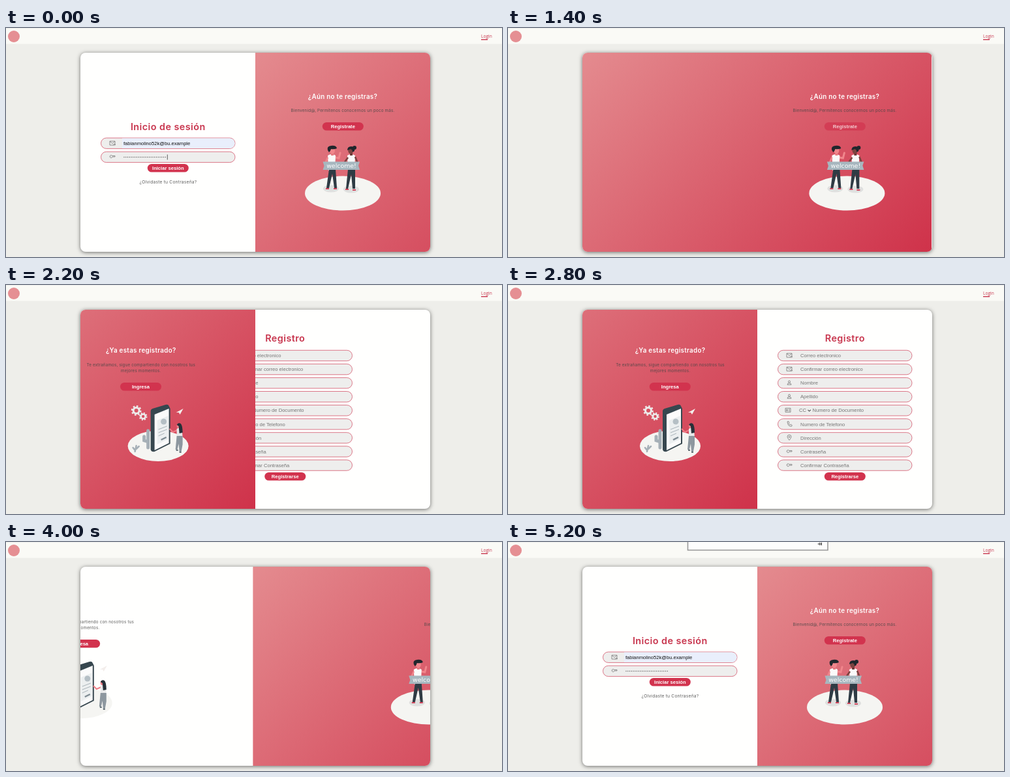
Recreate the animation shown at these times as an HTML page. Size 760x352 px, loop 5.3 s.

```html
<!DOCTYPE html>
<html lang="es">
<head>
<meta charset="utf-8">
<title>Inicio de sesión</title>
<style>
  html, body { margin: 0; width: 100%; height: 100%; overflow: hidden; background: #eeeeea; }
  svg { display: block; }
  text { font: 7.6px "Liberation Sans", Arial, sans-serif; }
  .mid, .btn text { text-anchor: middle; }
  .head { font: 600 14.4px Inter, sans-serif; letter-spacing: .03em; fill: #c8364e; }
  .sub { font: 600 9.8px Inter, sans-serif; letter-spacing: .03em; fill: #fff; }
  .note { font: 6.25px Inter, sans-serif; letter-spacing: .03em; fill: #444; fill-opacity: .85; }
  .btn rect { fill: #d2334e; }
  .btn text { font-weight: bold; fill: #fff; }
  .hint { fill: #757575; }
  .field { fill: #eeeeed; stroke: #d9687b; stroke-width: .9; }
  .icon { fill: none; stroke: #777; stroke-width: .8; stroke-linejoin: round; }
  .card { filter: drop-shadow(0 1px 3px rgba(0, 0, 0, .55)); }
</style>
</head>
<body>
<svg width="760" height="352">
  <defs>
    <linearGradient id="rose" gradientUnits="userSpaceOnUse" x1="57.5" y1="-57.5" x2="478.5" y2="363.5">
      <stop stop-color="#e48b8f"/><stop offset="1" stop-color="#cf324a"/>
    </linearGradient>
    <clipPath id="clip"><rect x="114" y="38" width="536" height="306" rx="8"/></clipPath>
  </defs>

  <rect width="760" height="24.5" fill="#fafaf6"/>
  <path d="M0 .3H760" stroke="#e6e6e2" stroke-width=".6"/>
  <circle cx="12" cy="13" r="9" fill="#e58f93"/>
  <text x="728" y="15.3" style="font:6.6px 'Open Sans',sans-serif" fill="#c8364e">Login</text>
  <path d="M728 17.8h10" stroke="#c8364e" stroke-width="1.4"/>

  <rect class="card" x="114" y="38" width="536" height="306" rx="8" fill="#fffffe"/>
  <g clip-path="url(#clip)">
    <g id="login"></g>
    <g id="register"></g>
    <rect id="cover" width="536" height="306" fill="url(#rose)"/>

    <g id="askText">
      <text class="mid sub" x="516" y="108.5">¿Aún no te registras?</text>
      <text class="mid note" x="516" y="129.3">Bienvenid@, Permítenos conocernos un poco más.</text>
    </g>
    <g id="askArt">
      <ellipse cx="516" cy="254" rx="58" ry="26.5" fill="#f5f5f2"/>
      <g fill="#dfe0df"><ellipse cx="498" cy="247" rx="12" ry="5.5"/><ellipse cx="529" cy="248" rx="12" ry="5.5"/></g>
      <!-- left person -->
      <path d="M504 199l6 1 2-8" fill="none" stroke="#f0868c" stroke-width="3" stroke-linecap="round"/>
      <path d="M493 196q6-4 12 0l-1 23h-10z" fill="#fafafa"/>
      <path d="M495 217h10l2 29h-4l-3-22-5 22h-4z" fill="#2f3b44"/>
      <path d="M493 199l-4 9" stroke="#f0868c" stroke-width="2.6"/>
      <path d="M498 191h4v5h-4z" fill="#e67a80"/>
      <ellipse cx="500" cy="188.5" rx="4" ry="4.8" fill="#f0868c"/>
      <path d="M493 188q-2-6 5-7 8-1 9 4-4 2-9 1-1 4-3 5z" fill="#20262c"/>
      <path d="M490 247h5M502 247h5" stroke="#d2455c" stroke-width="2"/>
      <!-- right person -->
      <path d="M523 196q6-4 12 0l-1 23h-10z" fill="#fafafa"/>
      <path d="M524 217h11l0 30h-4l-2-22-5 22h-3z" fill="#2f3b44"/>
      <path d="M535 198l4 10M524 199l-5 7" stroke="#7b4340" stroke-width="2.6"/>
      <path d="M527 191h4v5h-4z" fill="#6c3936"/>
      <ellipse cx="528" cy="188.5" rx="3.8" ry="4.8" fill="#7b4340"/>
      <path d="M523 188q0-6 6-6 6 0 5 7l-3 2q0-4-3-5z" fill="#20262c"/>
      <circle cx="534" cy="184" r="3" fill="#20262c"/>
      <path d="M520 248h5M531 249h5" stroke="#d2455c" stroke-width="2"/>
      <!-- banner -->
      <path d="M485.500 205.500h56.500l-2 6 2 6.500h-56.500l2-6z" fill="#a7b7bf"/>
      <text class="mid" x="514" y="214.800" style="font:9.4px 'DejaVu Sans',sans-serif" fill="#fff">welcome!</text>
    </g>

    <g id="backText">
      <text class="mid sub" x="248.500" y="103.500">¿Ya estas registrado?</text>
      <text class="mid note" x="248.500" y="125">Te extrañamos, sigue compartiendo con nosotros tus</text>
      <text class="mid note" x="248.500" y="134.300">mejores momentos.</text>
    </g>
    <g id="backArt">
      <ellipse cx="248.500" cy="247.500" rx="46.500" ry="23.500" fill="#f5f5f2"/>
      <g fill="none" stroke="#ededec">
        <circle cx="215" cy="193" r="4.500" stroke-width="3"/>
        <circle cx="215" cy="193" r="6.800" stroke-width="2.200" stroke-dasharray="2.670"/>
        <circle cx="225.500" cy="202" r="3.500" stroke-width="2.600"/>
        <circle cx="225.500" cy="202" r="5.400" stroke-width="1.800" stroke-dasharray="2.120"/>
      </g>
      <path d="M276 196l11-6-5 9-2-3z" fill="#f3eeeb"/>
      <g fill="none" stroke="#a6b0b7" stroke-linecap="round">
        <path d="M233 250v-26M233 241l-6-2v-6" stroke-width="5"/>
        <path d="M213 256l2-9M210 250l3 4M219 248l-4 4" stroke-width="2.500"/>
      </g>
      <path d="M237 194q0-3 3-4l20-6q4-1 5 2l2 4v54l-24 12q-5 1-6-3z" fill="#37474f"/>
      <path d="M243 199l22-9v53l-22 11z" fill="#fbfbfb"/>
      <path d="M247 208l17-7v36l-17 8z" fill="#eceff0"/>
      <circle cx="257" cy="210" r="4.500" fill="#b5bfc5"/>
      <path d="M249 222l13-5M249 227l13-5M249 232l9-4" stroke="#a9b3b9"/>
      <path d="M253 238l8-4" stroke="#7f8c94" stroke-width="2.500"/>
      <path d="M278 223l-7 3-5-5" fill="none" stroke="#ee7f88" stroke-width="2"/>
      <path d="M277 221q5-3 8 1l1 12h-9z" fill="#e8e9ea"/>
      <path d="M277 232h9l0 13-2 11h-3l-1-12-2 9h-3z" fill="#8d979f"/>
      <ellipse cx="279.500" cy="216.500" rx="2.600" ry="3.500" fill="#ee7f88"/>
      <path d="M277 215q2-4 6-2 3 3 3 14l-5 1-1-11z" fill="#263038"/>
      <path d="M276 254h3M281 257h3" stroke="#37474f" stroke-width="1.500"/>
    </g>
  </g>

  <g id="bar">
    <rect x="275.500" y="-8" width="214.500" height="20.500" fill="#fdfdfd" stroke="#999" stroke-width="1.600"/>
    <path d="M474.500 3h2.500M477 1v4M477 2h3v2h-3M480.500 .8v4.400" fill="none" stroke="#444" stroke-width=".9"/>
  </g>
</svg>

<script>
const LOOP = 5300, HALF = 268;
const el = id => document.getElementById(id);

const ICONS = {
  mail: 'M-4-3h8v6h-8zM-4-3l4 3.500 4-3.500M1 3l2-2 2 2',
  key: 'M0-1h4v1.500h-4M0-.5a2 2 0 1 0 0 1.200M-2.500 0h.5',
  user: 'M-1.500-1.500a1.500 1.700 0 1 0 3 0a1.500 1.700 0 1 0-3 0M-3 3q0-2.500 3-2.500t3 2.500z',
  card: 'M-4-3h8v6h-8zM-2.500-1h2v2h-2zM1-1h2M1 1h2',
  phone: 'M-3-3.500l2-.3 1 2.300-1 1q.7 1.600 2 2.200l1.200-1 2 1.300-.5 1.700q-6 1-6.700-7.200z',
  pin: 'M0 4q-3-3.500-3-5.200a3 3 0 0 1 6 0q0 1.700-3 5.200zM-1-1a1 1 0 1 0 2 0a1 1 0 1 0-2 0'
};

const field = (x, y) => `<rect class="field" x="${x}" y="${y - 8.2}" width="205.500" height="16.400" rx="8.200"/>`;
const icon = (name, x, y) => `<path class="icon" d="${ICONS[name]}" transform="translate(${x} ${y})"/>`;
const button = (label, cx, cy, id = '') => `<g class="btn" id="${id}">
  <rect x="${cx - 31.5}" y="${cy - 6.3}" width="63" height="12.600" rx="6.300"/>
  <text x="${cx}" y="${cy + 2.7}">${label}</text></g>`;

el('login').innerHTML = `
  <text class="mid head" x="248.300" y="156.500">Inicio de sesión</text>
  ${field(145.5, 177.2)}${field(145.5, 198.4)}
  <path d="M178 169.500h165a7.700 7.700 0 0 1 0 15.400h-165z" fill="#e9effc"/>
  ${icon('mail', 163, 177)}${icon('key', 163, 197.5)}
  <text x="180" y="179.900" fill="#111">fabianmolino52k@bu.example</text>
  <path d="M181 198.500h66" stroke="#666" stroke-width="1.500" stroke-linecap="round" stroke-dasharray="0 2.750"/>
  <path id="caret" d="M247.300 194.500v8" stroke="#222" stroke-width=".7"/>
  ${button('Iniciar sesión', 248.3, 215.3)}
  <text class="mid note" style="font-size:6.700px" x="248.500" y="239.200">¿Olvidaste tu Contraseña?</text>`;

const rows = [
  ['mail', 'Correo electronico'], ['mail', 'Confirmar correo electronico'],
  ['user', 'Nombre'], ['user', 'Apellido'], ['card', 'Numero de Documento'],
  ['phone', 'Numero de Telefono'], ['pin', 'Dirección'],
  ['key', 'Contraseña'], ['key', 'Confirmar Contraseña']
];
el('register').innerHTML = '<text class="mid head" x="516.300" y="87.300">Registro</text>' +
  rows.map(([name, label], i) => {
    const y = 108.5 + i * 21.07, id = name === 'card';
    return field(413.5, y) + icon(name, id ? 429 : 431, y - .4) +
      `<text class="hint" x="${id ? 466.5 : 448}" y="${y + 2.7}">${label}</text>` +
      (id ? `<text class="hint" x="446" y="${y + 2.7}">CC</text>
        <path d="M459.500 ${y - 1}l2.200 2.200 2.200-2.200" fill="none" stroke="#555" stroke-width="1.100"/>` : '');
  }).join('') + button('Registrarse', 516.3, 294.2);

el('askText').insertAdjacentHTML('beforeend', button('Registrate', 516.3, 151.3, 'askBtn'));
el('backText').insertAdjacentHTML('beforeend', button('Ingresa', 248.3, 156.2, 'backBtn'));

const ramp = (t, start, length) => Math.min(1, Math.max(0, (t - start) / length));

// cubic-bezier(.42, 0, .58, 1)
function ease(x) {
  let lo = 0, hi = 1;
  for (let i = 0; i < 24; i++) {
    const s = (lo + hi) / 2, r = 1 - s;
    if (1.26 * r * r * s + 1.74 * r * s * s + s ** 3 < x) lo = s; else hi = s;
  }
  return lo * lo * (3 - 2 * lo);
}

// 0 on the login side, 1 on the register side
const swap = (t, there, back, length) => ease(ramp(t, there, length)) - ease(ramp(t, back, length));
const hover = (t, on, off) => 1 - .62 * (ramp(t, on, 200) - ramp(t, off, 200));
const move = (id, x, y = 0) => el(id).setAttribute('transform', `translate(${x} ${y})`);
const fade = (id, v) => el(id).setAttribute('opacity', v);

function draw(t) {
  const cover = swap(t, 900, 3060, 1000);
  const text = swap(t, 1445, 3560, 1000);
  const art = swap(t, 1315, 3467, 1067);
  const form = swap(t, 1600, 3760, 1000);
  const shown = ramp(t, 1600, 200) - ramp(t, 3760, 200);

  move('cover', 382 - 536 * cover, 38);
  move('askText', 340 * text);
  move('askArt', 264 * art);
  move('backText', 340 * (text - 1));
  move('backArt', 264 * (art - 1));
  move('login', HALF * form);
  move('register', HALF * (form - 1));
  fade('login', 1 - shown);
  fade('register', shown);
  fade('askBtn', hover(t, 700, 1300));
  fade('backBtn', hover(t, 2850, 3250));
  fade('caret', t < 500 ? 1 : 0);
  move('bar', 0, -15 * (1 - ramp(t, 4300, 200)));
}

function tick() {
  draw(performance.now() % LOOP);
  requestAnimationFrame(tick);
}
tick();
</script>
</body>
</html>
```
